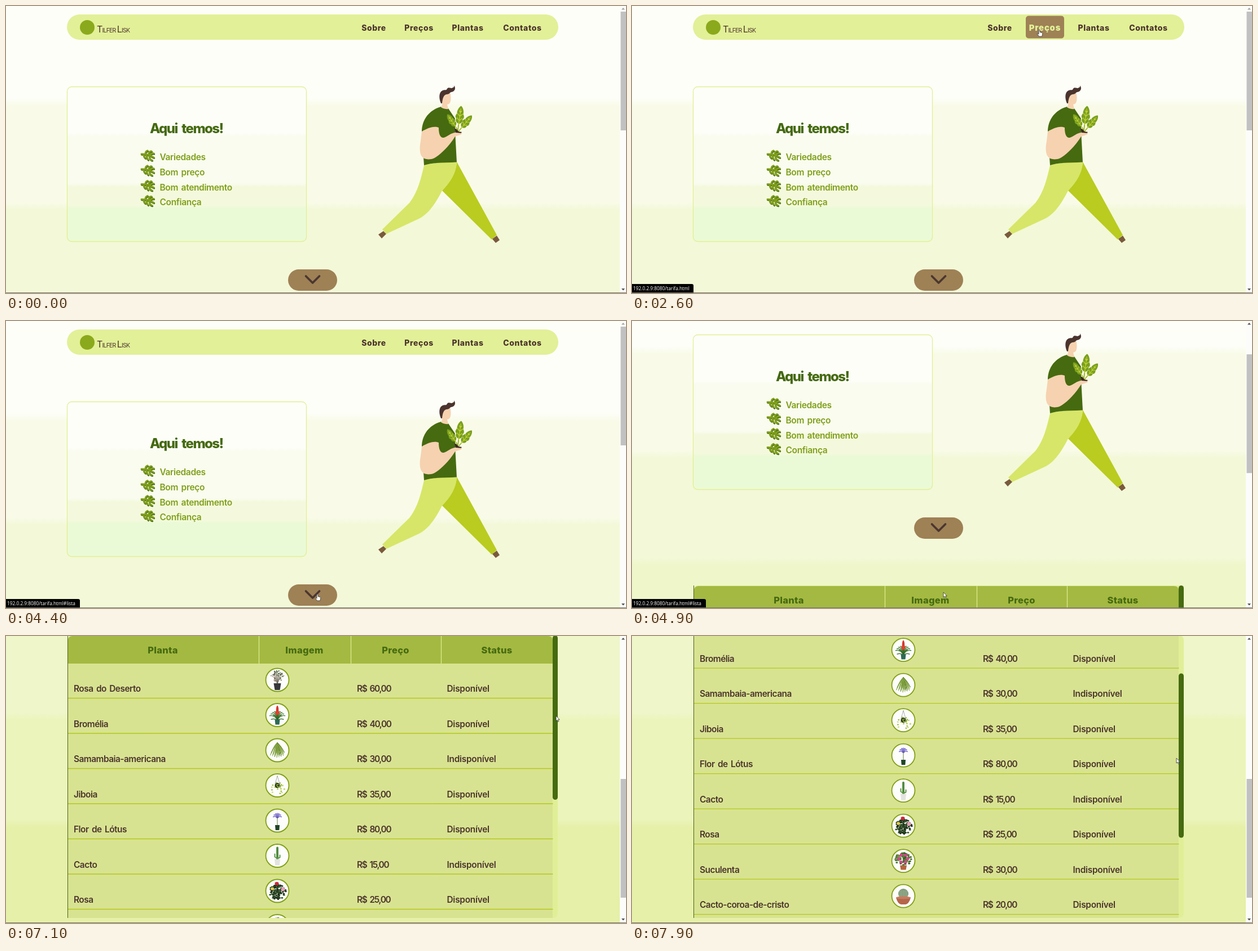
Recreate the animation shown at these times as an HTML page. Size 1099 by 510 pixels, loop 8000 ms.

```html
<!DOCTYPE html>
<html lang="pt">
<head>
<meta charset="utf-8">
<title>Plantas</title>
<style>
  html, body { margin: 0; width: 100%; height: 100%; overflow: hidden; background: #fdfef8; }
  svg { display: block; width: 1099px; height: 510px; font-family: Inter, "Open Sans", sans-serif; }
  .link { font-weight: 800; font-size: 14px; letter-spacing: .6px; fill: #4b342d; text-anchor: middle; }
  .nav rect { fill: none; }
  .nav.on rect { fill: #9e8155; }
  .nav.on .link { font-size: 14.8px; font-weight: 900; letter-spacing: .8px; fill: #e2f097; }
  .brand { font-size: 10.5px; letter-spacing: -.8px; fill: #4b342d; }
  .brand .cap { font-size: 16px; }
  .title { font-weight: 800; font-size: 24px; letter-spacing: -1.6px; word-spacing: 4px; fill: #456a10; }
  .item { font-weight: 600; font-size: 15.5px; letter-spacing: -.35px; word-spacing: 2px; fill: #7f9f1a; }
  .head { font-weight: 800; font-size: 16.5px; letter-spacing: .3px; fill: #456a10; text-anchor: middle; }
  .cell { font-weight: 600; font-size: 15.4px; letter-spacing: -.25px; fill: #4b342d; }
  .name { letter-spacing: -.5px; word-spacing: 2px; }
  .price { letter-spacing: -1.3px; word-spacing: 2.4px; }
  .status { font: 8.3px "Open Sans", "Noto Sans", sans-serif; fill: #fff; }
</style>
</head>
<body>
<svg id="stage" viewBox="0 0 1099 510"></svg>
<script>
const stage = document.getElementById('stage');
const PAGE_TOP = 589, ROW = 62.5, TABLE_H = 502, CONTENT_H = 862.5;

const path = (d, fill, extra = '') => `<path d="${d}" fill="${fill}" ${extra}/>`;
const line = (d, stroke, width) =>
  `<path d="${d}" fill="none" stroke="${stroke}" stroke-width="${width}" stroke-linecap="round" stroke-linejoin="round"/>`;
const rect = (x, y, w, h, fill, extra = '') =>
  `<rect x="${x}" y="${y}" width="${w}" height="${h}" fill="${fill}" ${extra}/>`;
const blob = (x, y, rx, ry, fill) => `<ellipse cx="${x}" cy="${y}" rx="${rx}" ry="${ry}" fill="${fill}"/>`;
const text = (cls, x, y, s) => `<text class="${cls}" x="${x}" y="${y}">${s}</text>`;
const at = (x, y, body, more = '') => `<g transform="translate(${x} ${y}) ${more}">${body}</g>`;
const times = (n, f) => Array.from({ length: n }, (_, i) => f(i)).join('');

// Soft-edged colour bands: each entry is [start offset, colour].
function bands(id, list, soft) {
  const stops = list.map(([o, c], i) => {
    const end = i + 1 < list.length ? list[i + 1][0] - soft : 1;
    return `<stop offset="${o}" stop-color="${c}"/><stop offset="${end}" stop-color="${c}"/>`;
  }).join('');
  return `<linearGradient id="${id}" x1="0" y1="0" x2="0" y2="1">${stops}</linearGradient>`;
}

// Small plants
let seed = 7;
const random = () => (seed = (seed * 16807) % 2147483647) / 2147483647;
const scatter = (n, cy, rx, ry, r, colors) => times(n, i => {
  const a = random() * 6.28, d = Math.sqrt(random());
  return blob((Math.cos(a) * d * rx).toFixed(1), (cy + Math.sin(a) * d * ry).toFixed(1), r, r * .8, colors[i % colors.length]);
});
const fan = (n, y, len, spread, color, width) => times(n, i => {
  const a = (i / (n - 1) - .5) * spread, x = Math.sin(a) * len, top = y - Math.cos(a) * len;
  return line(`M0 ${y}Q${(x * .5).toFixed(1)} ${(top - 2).toFixed(1)} ${x.toFixed(1)} ${top.toFixed(1)}`, color, width);
});
const pot = (y, top, bottom, h, color) =>
  path(`M${-top} ${y}H${top}L${bottom} ${y + h}H${-bottom}Z`, color);

const plants = [
  fan(9, 7, 19, 1.4, '#6f6a58', .8) + scatter(44, -6, 10, 11, 1.3, ['#5d6b4c', '#87907a', '#4a573e', '#c9a9a6']) + pot(6, 6.5, 4.5, 12, '#38383b'),
  fan(10, 8, 15, 2.2, '#3f7a2e', 1.4) + fan(5, 9, 11, 2.9, '#2f6426', 1.3) + blob(0, -8, 2.3, 9, '#d8362a') + blob(0, -4, 3.8, 3, '#e2402f') + pot(8, 4.5, 3.5, 9, '#2c6a55'),
  times(27, i => {
    const x = (i - 13) * .95, tip = 13 - Math.abs(x) * .35 - i % 4 * 2.5;
    return line(`M0 -13Q${x * .5} -8 ${x} ${tip}`, ['#7f9f3a', '#9ab658', '#5f842a'][i % 3], 1.1);
  }),
  line('M0-17L-4-3M0-17L4-3', '#777', .6) + scatter(20, 6, 13, 9, 1.5, ['#9fbd3e', '#c5d86f']) + blob(0, 0, 4.5, 4.5, '#26331c') + scatter(10, -1, 7, 5, 1.4, ['#8fb135']),
  line('M0-6V9', '#5f7f3a', 1) + fan(7, -5, 7.5, 2.7, '#8278cf', 1.7) + blob(0, -6, 2.5, 1.5, '#6257b0') + pot(8, 4, 3.3, 9, '#1f4426'),
  line('M0-14V8', '#4d8a3b', 3.8) + line('M-4.5-3V2L0 5M4.5-1V3L0 5', '#5d9747', 2) + pot(6, 5, 3.8, 11, '#e3e3df'),
  scatter(100, 2, 15, 13, 1.9, ['#263f20', '#35562a', '#1b2f18']) + blob(-1, -13, 3.6, 3, '#cf2638') + blob(-9, -4, 3, 2.6, '#e9c94a') + blob(10, -3, 3.5, 3, '#ec9fbd'),
  scatter(80, -3, 15, 11, 2, ['#4d7a33', '#3b6428', '#66913f']) + times(6, i => blob(Math.cos(i * 1.05) * 8, -4 + Math.sin(i * 1.05) * 7, 2.8, 2.5, '#df3f91')) + pot(8, 6, 4.5, 8, '#b8643d'),
  blob(0, -4, 9, 9, '#7f9a78') + times(5, i => line(`M${(i - 2) * 3} -10V3`, '#a9bb9f', .8)) + path('M-13 3H13Q10 14 4 15H-4Q-10 14 -13 3Z', '#b5654a') + blob(0, 3, 13, 2.5, '#c77c5f')
];

// Page content
const navLinks = [['Sobre', 652, 60], ['Preços', 732, 68], ['Plantas', 818.5, 74], ['Contatos', 915.5, 87]];
const header = rect(108, 15, 871, 45, '#e2f097', 'rx="22.5"') +
  '<circle cx="144" cy="38" r="13" fill="#8ba91c"/>' +
  '<text class="brand" x="161" y="46.5"><tspan class="cap">T</tspan>ILFER <tspan class="cap">L</tspan>ISK</text>' +
  navLinks.map(([label, x, w]) =>
    `<g class="nav">${rect(x - w / 2, 17.5, w, 40, 'none', 'rx="5"')}${text('link', x, 43.5, label)}</g>`).join('');

const bulletShape = 'M-11-3Q0-3 7 1M-4-3Q-4-8 0-9M2-3Q2-8 7-8M4-1Q7-5 11-4M-7-2Q-7 2-4 4M-2-2Q-2 5 1 7M3 0Q3 7 8 8M7 1L11 3';
const bullet = at(.6, 1.3, line(bulletShape, '#3f6212', 3)) + line(bulletShape, '#7f9f1a', 3);
const card = rect(108.5, 143.5, 424, 275, 'url(#cardFill)', 'rx="8" stroke="#e2ee93" stroke-width="1.3"') +
  text('title', 255, 226, 'Aqui temos!') +
  ['Variedades', 'Bom preço', 'Bom atendimento', 'Confiança'].map((s, i) =>
    at(251, 266 + i * 26.8, bullet) + text('item', 272.5, 274 + i * 26.8, s)).join('');

const leaf = (x, y, angle, size) => at(x, y,
  line('M0 0V-14', '#9db626', 1.8) +
  path('M0-10C-4-11-7-14-5-18C-8-20-7-24-5-26C-6-31-3-37 0-39C3-37 6-31 5-26C7-24 8-20 5-18C7-14 4-11 0-10Z', '#7a9f1e') +
  line('M0-8V-34M0-15L-4-19M0-15L4-19M0-22L-4-26M0-22L4-26M0-28L-2-31M0-28L2-31', '#c3d535', 1.1),
  `rotate(${angle}) scale(${size})`);
const man =
  path('M799 277L870 407L861 415L773 328C787 314 798 296 799 277Z', '#b9cc1f') +
  path('M741 283C760 277 780 278 799 277.5C798 298 787 314 773 328C762 350 750 368 734 377L674 405L667 397L715 350C730 331 736 305 741 283Z', '#d7e668') +
  path('M660 406L669 400L674 405L666 413ZM862 414L870 408L875 416L868 421Z', '#7a5a3c') +
  path('M771 179C752 184 737 200 737 224L741 283C760 277 780 279 799 277.5L796 222V200L784 182Q776 184 771 179Z', '#466a10') +
  path('M774 163C775 158 780 158 784 154L787 153C789 160 789 168 787 172Q785 175 782 175L784 183Q777 184 771 180Q774 176 773 170Z', '#f6d2b0') +
  path('M771 173C767 164 767 153 774 150C778 148 780 151 782 147C785 143 789 148 792 145Q795 144 794 141C798 146 796 152 789 153C786 154 786 157 781 157C776 158 774 163 773 173Z', '#4a342d') +
  leaf(801, 221, -33, .88) + leaf(801, 220, 8, 1.1) + leaf(802, 223, 40, .95) +
  path('M795 217Q800 219 802 223L808 224Q806 228 797 227Z', '#3a2a24') +
  path('M737 223C750 215 760 213 767 216C767 228 770 235 776 234C783 232 789 225 797 225L808 226C809 229 800 230 796 232C785 250 765 270 754 272C735 275 731 262 735 240Z', '#f6d2b0');

const button = rect(500, 468, 87, 38, '#9e8155', 'rx="19"') + line('M531.5 480L543.5 492L555.5 480', '#4b362f', 3.7);

const rows = [
  ['Rosa do Deserto', '60', 1], ['Bromélia', '40', 1], ['Samambaia-americana', '30', 0],
  ['Jiboia', '35', 1], ['Flor de Lótus', '80', 1], ['Cacto', '15', 0],
  ['Rosa', '25', 1], ['Suculenta', '30', 0], ['Cacto-coroa-de-cristo', '20', 1]
];
const tableRow = ([name, price, inStock], i) => at(0, 50 + i * ROW,
  line(`M110 ${ROW - 1}H969`, '#b4c81c', 1.3) + text('cell name', 120, 50.3, name) +
  at(481, 29, `<circle r="20.5" fill="#fdfdfb" stroke="#7f9f14" stroke-width="1.8"/>${plants[i]}`) +
  text('cell price', 622, 50.3, `R$ ${price},00`) + text('cell', 781.5, 50.3, inStock ? 'Disponível' : 'Indisponível'));
const table = at(0, PAGE_TOP, `<g clip-path="url(#tableClip)">
  ${rect(109, 0, 869, TABLE_H, '#e0ef97', 'rx="8"')}
  <g id="inner">
    ${rect(110, 20, 859, CONTENT_H - 20, '#d8e391')}
    ${path('M110 50V9Q110 1 118 1H961Q969 1 969 9V50Z', '#a4b941')}
    ${[448.5, 611.5, 771.5].map(x => line(`M${x} 1.5V49.5`, '#e2ee93', 1.2)).join('')}
    ${[['Planta', 278], ['Imagem', 529], ['Preço', 690.5], ['Status', 870]].map(([s, x]) => text('head', x, 32, s)).join('')}
    ${rows.map(tableRow).join('')}
  </g>
  ${rect(109, 0, 1, TABLE_H, '#47601c')}
  ${rect(969, 0, 9, 292, '#456a10', 'rx="4.5" id="innerThumb"')}</g>`);

stage.innerHTML = `<defs>
  ${bands('pageFill', [[0, '#fdfef8'], [.15, '#f9fbe8'], [.306, '#f3f8d8'], [.467, '#eff6c9'], [.625, '#ebf4ba'], [.785, '#e6f0a8']], .012)}
  ${bands('cardFill', [[0, '#fdfef8'], [.32, '#f9fcee'], [.645, '#f4f9dd'], [.785, '#ebfad6']], .02)}
  <clipPath id="tableClip"><rect x="109" width="869" height="${TABLE_H}"/></clipPath></defs>
  <g id="page">${rect(0, 0, 1088, 1185, 'url(#pageFill)')}${header}${card}${man}${button}${table}</g>
  ${rect(1088, 0, 11, 510, '#fcfcfa')}
  ${rect(1089.5, 10, 9.5, 211, '#c1c1c1', 'id="thumb"')}
  ${path('M1091 6.5L1094 3L1097 6.5Z', '#a3a3a3', 'id="upArrow"')}${path('M1091 502L1094 505.5L1097 502Z', '#505050')}
  <g id="status"><path id="statusBox"/><text class="status" id="statusText" x="2" y="504.8"></text></g>
  ${rect(0, 509, 1099, 1, '#6f7466')}
  <g id="cursor" stroke="#333" stroke-width=".8" stroke-linejoin="round" fill="#fff">
    <path id="arrow" d="M0 0V9L2 7.2L3.5 10.3L5 9.6L3.6 6.6H6.3Z"/>
    <path id="hand" d="M-1 .8Q0-.6 1 .8V4.5L5 5.6Q6 6 5.7 8L4.8 12H-.5L-3.6 8Q-4 6.6-2.6 7L-1 8.2Z"/></g>`;

// Motion: each track lists [ms, value...] and is read at ten steps per second.
const cursorTrack = [[700, 14, 4], [1000, 270, 60], [1400, 563, 84], [1500, 563, 84], [1600, 588.5, 73], [1900, 640, 48],
  [2200, 655, 40], [2300, 655, 40], [2600, 722, 42], [2900, 815, 42], [3200, 868, 42], [3300, 892, 41], [3400, 906, 41],
  [3500, 906, 41], [3600, 900, 55], [4000, 720, 270], [4400, 552, 485], [4500, 552, 482], [5400, 552, 482],
  [5800, 800, 290], [6100, 964, 155], [6500, 966, 148], [6900, 975, 142], [7100, 975, 142], [7900, 965, 217]];
const scrollTrack = [[4600, 0], [4700, 10], [4800, 48], [4900, 119], [5000, 255], [5100, 420], [5200, 420], [5300, 585], [5400, 590]];
const innerTrack = [[7100, 0], [7900, 67.5]];
const host = '192.0.2.9:8080/';
const statusTrack = [[0, ''], [2600, 'tarifa.html', 109], [3300, 'recados.html', 114], [3800, ''], [4300, 'tarifa.html#lista', 131], [5400, '']];

function sample(track, t) {
  if (t <= track[0][0]) return track[0].slice(1);
  const i = track.findIndex(k => k[0] >= t);
  if (i < 0) return track[track.length - 1].slice(1);
  const a = track[i - 1], b = track[i], p = (t - a[0]) / (b[0] - a[0]);
  return a.slice(1).map((v, j) => v + (b[j + 1] - v) * p);
}

const el = id => document.getElementById(id);
const show = (node, on) => node.setAttribute('visibility', on ? 'visible' : 'hidden');
const move = (id, x, y) => el(id).setAttribute('transform', `translate(${x} ${y})`);
const navNodes = [...stage.querySelectorAll('.nav')];

function draw(t) {
  const [x, y] = sample(cursorTrack, t), [scroll] = sample(scrollTrack, t), [drag] = sample(innerTrack, t);
  move('page', 0, -scroll);
  move('thumb', 0, scroll * .4136);
  el('upArrow').setAttribute('fill', scroll > 0 ? '#505050' : '#a3a3a3');
  move('innerThumb', 0, drag);
  move('inner', 0, -drag * CONTENT_H / TABLE_H);

  let link = false;
  navNodes.forEach((node, i) => {
    const [, cx, w] = navLinks[i];
    const on = t >= 700 && scroll === 0 && Math.abs(x - cx) < w / 2 && y > 17 && y < 58;
    node.classList.toggle('on', on);
    link = link || on;
  });
  const pageY = y + scroll;
  link = link || (x > 500 && x < 587 && pageY > 468 && pageY < 506);
  move('cursor', x, y);
  show(el('arrow'), t >= 700 && !link);
  show(el('hand'), t >= 700 && link);

  const [, label, width] = statusTrack.filter(k => k[0] <= t).pop();
  show(el('status'), label);
  if (label) {
    el('status').setAttribute('opacity', t >= 5300 ? .58 : 1);
    el('statusBox').setAttribute('d', `M0 494H${width - 3}Q${width} 494 ${width} 497V510H0Z`);
    el('statusText').textContent = host + label;
  }
}

const start = performance.now();
function tick() {
  draw(Math.floor((performance.now() - start) % 8000 / 100) * 100);
  requestAnimationFrame(tick);
}
tick();
</script>
</body>
</html>
```
